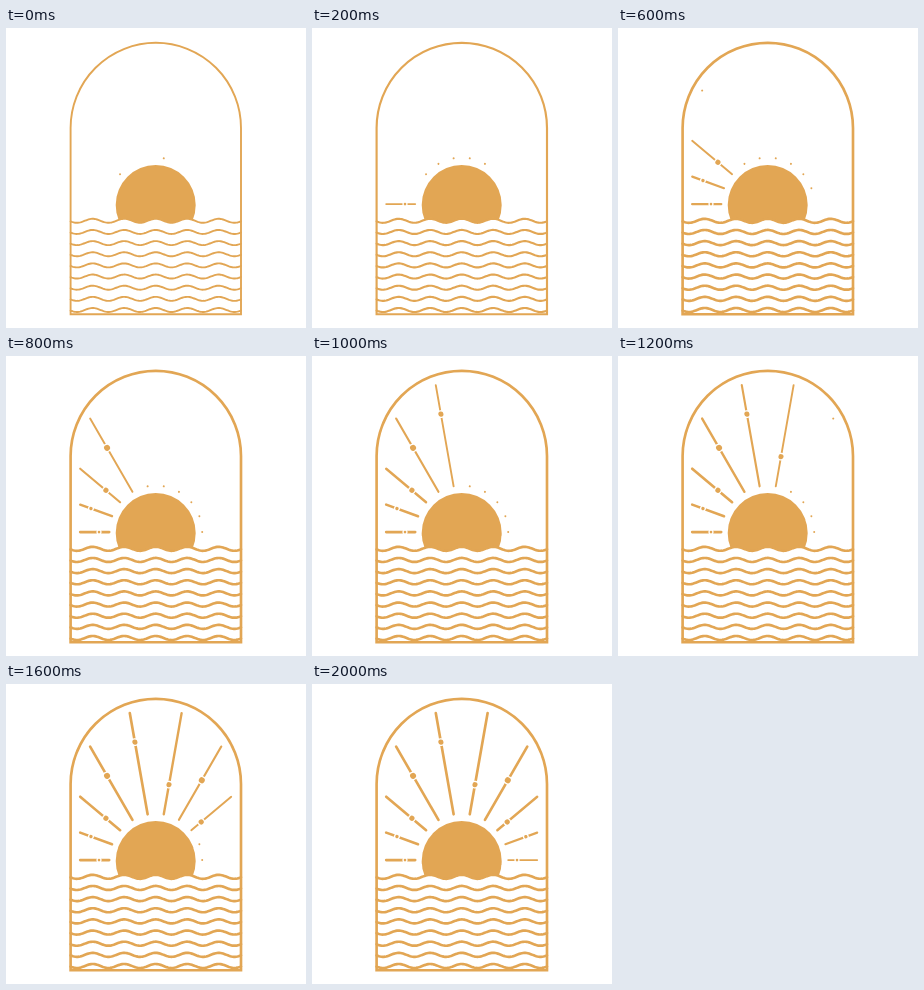
Write an HTML page that moves like this. It is 300 px wide and 300 px high and loops after 2.2 s.

```html
<!DOCTYPE html>
<html lang="en">
<head>
<meta charset="utf-8">
<title>Sunrise</title>
<style>
  html, body { margin: 0; width: 100%; height: 100%; overflow: hidden; background: #fff; }
  svg { display: block; width: 100vw; height: 100vh; }
  .line { fill: none; stroke: #e2a654; stroke-linecap: round; }
  .fill { fill: #e2a654; }
  .bead { fill: #e2a654; stroke: #fff; stroke-width: 2.6; paint-order: stroke; }
</style>
</head>
<body>
<svg viewBox="0 0 300 300">
  <defs><clipPath id="sky"><path id="skyShape"/></clipPath></defs>
  <circle class="fill" cx="149.7" cy="177" r="40" clip-path="url(#sky)"/>
  <g id="scene" class="line">
    <path d="M64.6 286.2V100A85.2 85.2 0 0 1 235 100V286.2Z"/>
  </g>
  <g id="rays"></g>
</svg>
<script>
const STEP = 200, RAYS = 10;
const CENTER_X = 149.7, RAY_Y = 176.1, ARCH_Y = 100;
const LEFT = 64.6, RIGHT = 235;
const WATERLINE = 192.8, ROW_GAP = 11.15, WAVELENGTH = 31.5;
const INNER = 46.5, INSET = 75.5;
const beadDistances = [56.7, 68.9, 65, 97.3, 119.8, 76.6, 92.2, 59.4, 68.3, 55.3];

function add(parent, tag, attrs) {
  const el = document.createElementNS("http://www.w3.org/2000/svg", tag);
  for (const key in attrs) el.setAttribute(key, attrs[key]);
  return parent.appendChild(el);
}

function wave(y) {
  const points = [];
  for (let i = 0; i <= 142; i++) {
    const x = LEFT + (RIGHT - LEFT) * i / 142;
    const crest = 2 * Math.cos((x - CENTER_X) * 2 * Math.PI / WAVELENGTH);
    points.push(x.toFixed(2) + " " + (y - crest).toFixed(2));
  }
  return "M" + points.join("L");
}

// Distance from the sun's centre to an arch set inside the border.
function reach(angle) {
  const rise = RAY_Y - ARCH_Y;
  const cos = Math.abs(Math.cos(angle)), sin = Math.sin(angle);
  const toWall = INSET / cos;
  return toWall * sin <= rise ? toWall : rise * sin + Math.sqrt(INSET ** 2 - (rise * cos) ** 2);
}

function makeRay(bead, i) {
  const degrees = 20 * i;
  const angle = degrees * Math.PI / 180;
  const steepness = Math.min(angle, Math.PI - angle);
  const outer = reach(angle);
  const group = add(document.getElementById("rays"), "g", {
    transform: `translate(${CENTER_X} ${RAY_Y}) rotate(${180 + degrees})`
  });
  const body = add(group, "g", {});
  const line = add(body, "line", { class: "line", x1: INNER, x2: outer });
  add(body, "circle", { class: "bead", cx: bead, r: 1.3 + 1.7 * Math.sin(1.5 * steepness) ** 2 });
  const root = add(group, "circle", { class: "fill", cx: INNER, r: 1 });
  const tip = add(group, "circle", { class: "fill", cx: outer, r: 1 });
  return { body, line, root, tip };
}

const scene = document.getElementById("scene");
for (let row = 0; row < 9; row++) add(scene, "path", { d: wave(WATERLINE + row * ROW_GAP) });
document.getElementById("skyShape").setAttribute("d", wave(WATERLINE) + "V100H" + LEFT + "Z");
const rays = beadDistances.map(makeRay);

// Lines gain a little weight after they appear.
const weight = age => 1.9 + .25 * Math.max(0, Math.min(age, 3));
const show = (el, on) => { el.style.display = on ? "" : "none"; };

function draw(now) {
  const step = Math.floor(now / STEP) % (RAYS + 1);
  scene.style.strokeWidth = weight(step);
  rays.forEach(({ body, line, root, tip }, i) => {
    const age = step - i - 1;
    const pending = age < 0 && i > 1;
    // Sparks spread outwards from the third and sixth rays.
    const sparkStart = Math.min(Math.abs(i - 2), Math.abs(i - 5));
    show(body, age >= 0);
    show(root, pending && step >= sparkStart);
    show(tip, pending && age === -1 && i % 3 === 0);
    line.style.strokeWidth = weight(age);
  });
}

const start = performance.now();
function tick() {
  draw(performance.now() - start);
  requestAnimationFrame(tick);
}
tick();
</script>
</body>
</html>
```
